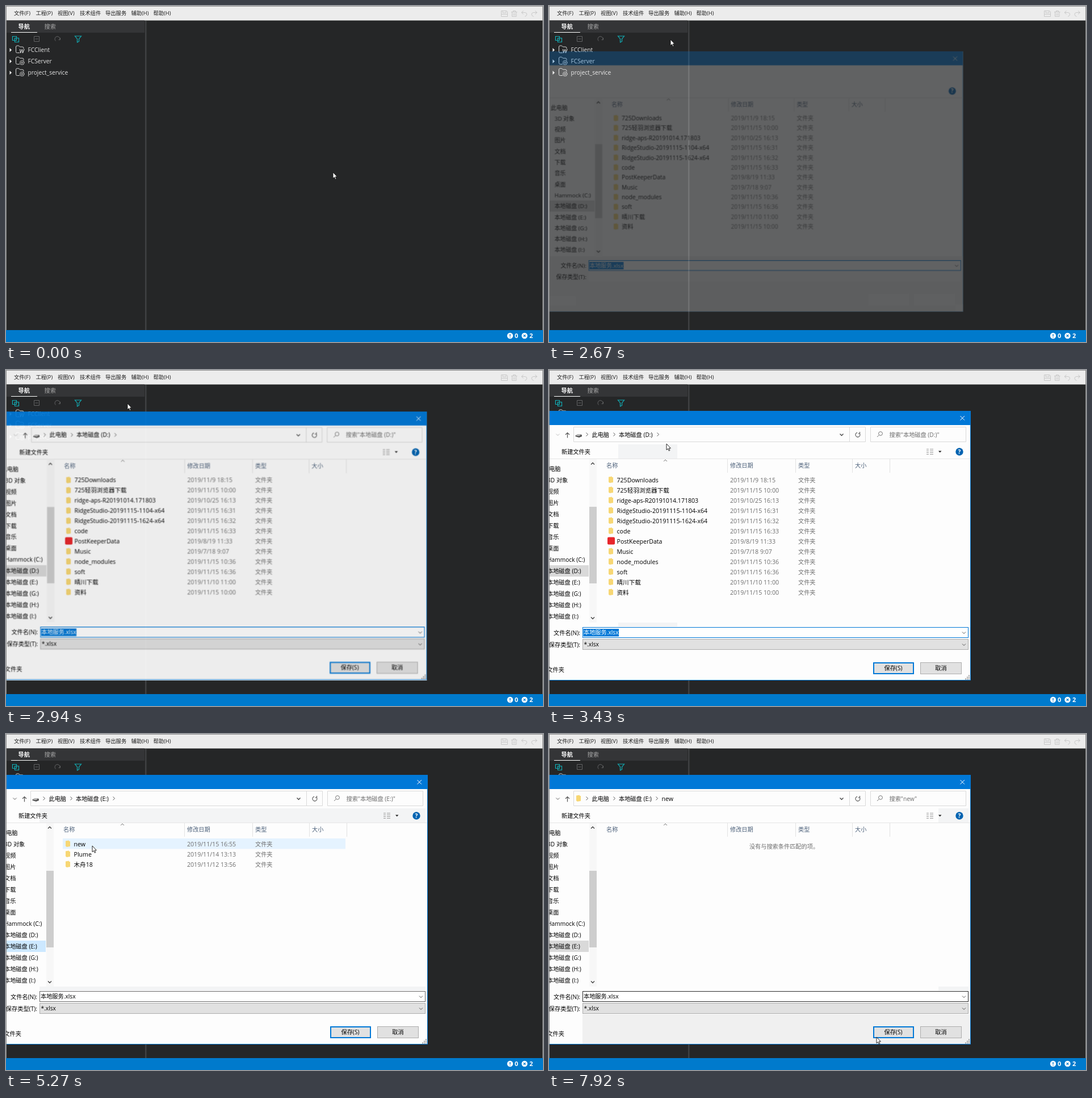
Recreate the animation shown at these times as an HTML page. Size 946x592 px, loop 8000 ms.

```html
<!DOCTYPE html>
<html>
<head>
<meta charset="utf-8">
<title>Export local services</title>
<style>
html, body { margin: 0; width: 100%; height: 100%; overflow: hidden; background: #252627; }
svg { display: block; width: 946px; height: 592px; }
text { font: 10.2px "Open Sans", "Noto Sans CJK SC", "Noto Sans CJK", sans-serif; white-space: pre; }
.line { fill: none; }
.bar text { font-size: 9.3px; fill: #1c1c1c; }
.tree text { font-size: 10.2px; fill: #e4e4e4; }
.status text { font-size: 11px; font-weight: 700; fill: #fff; }
.head text { fill: #4c607a; }
.latin { font-size: 10.6px; }
.date { font-size: 10.6px; fill: #6d6d6d; }
.grey { fill: #6d6d6d; }
.end { text-anchor: end; }
.mid { text-anchor: middle; }

/* Everything switches in hard steps on one 8 s clock (1% = 80 ms). */
.k { animation: 8s step-end infinite; }
.menu { animation-name: menu; }
.dialog { animation-name: dialog; transform-origin: 362px 309.5px; }
.early { animation-name: early; }
.late { animation-name: late; }
.in-d { animation-name: in-d; }
.in-e { animation-name: in-e; }
.in-new { animation-name: in-new; }
.marked { animation-name: marked; }
.field { animation-name: field; }
.pick { animation-name: pick; }
.drive-hover { animation-name: drive-hover; }
.row-hover { animation-name: row-hover; }
.band { animation-name: band; }
.foot { animation-name: foot; }
.pointer { animation-name: pointer; }
.arrow { animation-name: arrow; }
.hand { animation-name: hand; }

@keyframes menu { 0% { opacity: 0 } 17.25% { opacity: 1 } 31.5%, 100% { opacity: 0 } }
@keyframes dialog {
  0% { opacity: 0; transform: scale(.96) }
  33.375% { opacity: .28; transform: scale(.965) }
  34.875% { opacity: .6; transform: scale(.979) }
  36.75% { opacity: .93; transform: scale(.996) }
  38.625%, 100% { opacity: 1; transform: scale(1) }
}
@keyframes early { 0% { opacity: 1 } 36.75%, 100% { opacity: 0 } }
@keyframes late { 0% { opacity: 0 } 36.75%, 100% { opacity: 1 } }
@keyframes in-d { 0% { opacity: 1 } 56.375%, 100% { opacity: 0 } }
@keyframes in-e { 0% { opacity: 0 } 56.375% { opacity: 1 } 71%, 100% { opacity: 0 } }
@keyframes in-new { 0% { opacity: 0 } 71%, 100% { opacity: 1 } }
@keyframes marked { 0% { opacity: 1 } 54.75%, 100% { opacity: 0 } }
@keyframes field { 0% { stroke: #0078d7 } 57.875% { stroke: #6a6a6a } 87.875%, 100% { stroke: #2b2b2b } }
@keyframes pick {
  0% { fill: #d9d9d9; transform: translateY(0) }
  54.75% { fill: #cce8ff; transform: translateY(20px) }
  67.5%, 100% { fill: #d9d9d9; transform: translateY(20px) }
}
@keyframes drive-hover { 0% { opacity: 0 } 51.375% { opacity: 1 } 54.75%, 100% { opacity: 0 } }
@keyframes row-hover {
  0% { opacity: 0; fill: #e5f3ff; transform: translateY(0) }
  44.75% { opacity: 1; fill: #e5f3ff; transform: translateY(0) }
  46.375% { opacity: 1; fill: #e5f3ff; transform: translateY(54px) }
  48% { opacity: 1; fill: #e5f3ff; transform: translateY(108px) }
  49.625% { opacity: 0; fill: #e5f3ff; transform: translateY(0) }
  61.125% { opacity: 1; fill: #e5f3ff; transform: translateY(36px) }
  62.625% { opacity: 1; fill: #e5f3ff; transform: translateY(18px) }
  64.25% { opacity: 1; fill: #e5f3ff; transform: translateY(0) }
  67.5% { opacity: 1; fill: #cce8ff; transform: translateY(0) }
  71%, 100% { opacity: 0; fill: #cce8ff; transform: translateY(0) }
}
@keyframes band {
  0% { opacity: 0; x: 122px; width: 104px }
  40.5% { opacity: 1; x: 122px; width: 104px }
  46.375% { opacity: 1; x: 100px; width: 498px }
  57.875% { opacity: 1; x: 59px; width: 680px }
  71%, 100% { opacity: 1; x: 686px; width: 53px }
}
@keyframes foot { 0% { opacity: 0 } 92.625%, 100% { opacity: 1 } }
@keyframes arrow {
  0% { opacity: 1 } 13.875% { opacity: 0 } 31.5% { opacity: 1 }
  51.375% { opacity: 0 } 57.875%, 100% { opacity: 1 }
}
@keyframes hand {
  0% { opacity: 0 } 13.875% { opacity: 1 } 31.5% { opacity: 0 }
  51.375% { opacity: 1 } 57.875%, 100% { opacity: 0 }
}
@keyframes pointer {
  0% { transform: translate(576px, 293px) }
  1.875% { transform: translate(545px, 268px) }
  3.5% { transform: translate(430px, 188px) }
  5.25% { transform: translate(250px, 96px) }
  7% { transform: translate(95px, 40px) }
  8.625% { transform: translate(26px, 18px) }
  10.375% { transform: translate(75px, 12px) }
  12.125% { transform: translate(142px, 9px) }
  13.875% { transform: translate(188px, 9px) }
  17.25% { transform: translate(190px, 11px) }
  19% { transform: translate(193px, 15px) }
  21% { transform: translate(201px, 30px) }
  22.875% { transform: translate(209px, 44px) }
  24.375% { transform: translate(212px, 52px) }
  26.25% { transform: translate(214px, 57px) }
  28% { transform: translate(214px, 59px) }
  40.5% { transform: translate(212px, 85px) }
  42.875% { transform: translate(207px, 130px) }
  44.75% { transform: translate(185px, 190px) }
  46.375% { transform: translate(153px, 244px) }
  48% { transform: translate(118px, 298px) }
  49.625% { transform: translate(78px, 345px) }
  51.375% { transform: translate(52px, 371px) }
  53% { transform: translate(45px, 379px) }
  57.875% { transform: translate(58px, 348px) }
  59.5% { transform: translate(90px, 290px) }
  61.125% { transform: translate(124px, 230px) }
  62.625% { transform: translate(144px, 207px) }
  64.25% { transform: translate(151px, 199px) }
  65.875% { transform: translate(152px, 197px) }
  79.5% { transform: translate(181px, 252px) }
  81.25% { transform: translate(215px, 295px) }
  82.875% { transform: translate(224px, 323px) }
  84.5% { transform: translate(208px, 380px) }
  86.125% { transform: translate(150px, 435px) }
  87.875% { transform: translate(190px, 460px) }
  89.5% { transform: translate(310px, 474px) }
  91.125% { transform: translate(430px, 478px) }
  92.625% { transform: translate(520px, 508px) }
  94.25% { transform: translate(560px, 527px) }
  96% { transform: translate(573px, 533px) }
  99%, 100% { transform: translate(577px, 534px) }
}
</style>
</head>
<body>
<svg viewBox="0 0 946 592">
  <defs>
    <path id="folder" d="M0 .5 6-.5V1H8V10L2 11 0 9.5Z" fill="#f7d774"/>
    <path id="next" class="line" d="M-1.5-3 1.5 0-1.5 3" stroke="#555"/>
    <path id="down" class="line" d="M-3-1.5 0 1.5 3-1.5"/>
    <g id="project" class="line" stroke="#d5d5d5">
      <path d="M24 5.5H19.5Q17.5 5.5 17.5 3.5V-5Q17.5-7 19.5-7H22.5L24.5-5H29Q31 -5 31-3V-1.5"/>
    </g>
    <g id="gear" class="line" stroke="#d5d5d5">
      <circle cx="28.3" cy="2.8" r="3.6" stroke-width="1.3" stroke-dasharray="1.6 .7"/>
      <circle cx="28.3" cy="2.8" r="1.3"/>
    </g>
  </defs>

  <rect width="946" height="592" fill="#252627"/>

  <!-- menu bar -->
  <g class="bar">
    <rect width="946" height="25.5" fill="#ececec"/>
    <rect class="k menu" x="171" y="1" width="45" height="25" fill="#fdfdfd"/>
    <text x="14" y="16">文件(F)</text><text x="52.5" y="16">工程(P)</text>
    <text x="91" y="16">视图(V)</text><text x="130" y="16">技术组件</text>
    <text x="175" y="16">导出服务</text><text x="220.5" y="16">辅助(H)</text>
    <text x="259.5" y="16">帮助(H)</text>
    <g class="line" stroke="#c9c9c9">
      <path d="M872.5 8.5H881.5L883.5 10V18.5H872.5ZM875 8.5V12H881V8.5M872.5 14.5H883.5"/>
      <path d="M890 10.5H900.5M893.5 10V8.5H897.5V10M891.5 11V18.5H899V11M894 12.5V17M896.5 12.5V17"/>
      <path d="M911.5 8.5 908 11.5 911.5 14.5M908 11.5H914.5Q918 12 917.5 15T914 18.5"/>
      <path d="M932 8.5 935.5 11.5 932 14.5M935.5 11.5H929Q925.5 12 926 15T929.5 18.5"/>
    </g>
  </g>

  <!-- navigator -->
  <g class="tree">
    <rect x="1" y="25.5" width="243" height="21.5" fill="#343537"/>
    <rect x="245" y="26" width="2.5" height="545" fill="#3f4042"/>
    <text x="21.5" y="39.5" style="fill:#fff;font-weight:700">导航</text>
    <text x="67.5" y="39.5" style="fill:#a9a9a9">搜索</text>
    <rect x="9" y="46" width="46" height="1" fill="#fff"/>
    <g class="line" stroke="#12aeb6" stroke-width="1.2">
      <path d="M11.5 53.5H18.5V60.5H11.5ZM15.5 56.5H22.5V63.5H15.5Z"/>
      <path d="M121.5 53H132.5L128.5 58V62.5L125.5 64V58Z"/>
    </g>
    <g class="line" stroke="#626364">
      <path d="M49.5 53.5H58.5V62.5H49.5ZM51.5 58H56.5"/>
      <path d="M87.5 61.5A4.5 4.5 0 1 1 95 58.5M95.5 56V59.5H92.5"/>
    </g>
    <g id="projects"></g>
  </g>

  <!-- status bar -->
  <g class="status">
    <rect y="571" width="946" height="21" fill="#007acc"/>
    <circle cx="888" cy="581" r="5.2" fill="#fff"/>
    <path d="M888 578V582M888 583V584.3" stroke="#007acc" stroke-width="1.4"/>
    <text x="896" y="585">0</text>
    <circle cx="913.5" cy="581" r="5.2" fill="#fff"/>
    <path d="M911.6 579.1 915.4 582.9M915.4 579.1 911.6 582.9" stroke="#007acc" stroke-width="1.3"/>
    <text x="922" y="585">2</text>
  </g>

  <g class="k menu bar">
    <rect x="171" y="25" width="166.5" height="50.5" fill="#fdfdfd"/>
    <text x="188" y="40.7">导出已发布服务</text>
    <text x="188" y="65.5">导出本地服务</text>
  </g>

  <!-- save dialog -->
  <g class="k dialog">
    <rect x="-20" y="72" width="763" height="475" fill="#0078d7"/>
    <rect x="-20" y="97" width="762" height="449" fill="#fdfdfd"/>
    <path d="M724.5 81 732 88.5M732 81 724.5 88.5" stroke="#fff"/>
    <rect class="k band" y="131" height="26" fill="#f3f4f5"/>
    <rect class="k band" y="445" height="7" fill="#f3f4f5"/>
    <rect class="k foot" x="59" y="494" width="683" height="52" fill="#f0f0f0"/>
    <rect class="k early" x="-20" y="446" width="762" height="100" fill="#f0f0f0"/>
    <path d="M-20 156.5H742" stroke="#e6e6e6"/>
    <circle cx="723" cy="144" r="6.7" fill="#0063b1"/>
    <text class="mid" x="723" y="147.6" style="fill:#fff;font-weight:700">?</text>

    <g class="head">
      <path d="M314.5 157V181M434.5 157V181M534.5 157V181M600.5 157V181" stroke="#e2e2e2"/>
      <path class="line" d="M202 161 205 158 208 161" stroke="#777"/>
      <text x="101" y="172">名称</text><text x="319" y="172">修改日期</text>
      <text x="439" y="172">类型</text><text x="539" y="172">大小</text>
    </g>

    <!-- drives -->
    <rect x="71" y="157" width="13" height="288" fill="#f7f7f7"/>
    <rect x="71" y="241" width="13" height="135" fill="#cdcdcd"/>
    <use href="#down" transform="translate(77 165) scale(1 -1)" stroke="#444" stroke-width="1.4"/>
    <use href="#down" x="77" y="437" stroke="#444" stroke-width="1.4"/>
    <rect class="k pick" x="-20" y="344" width="90" height="20"/>
    <rect class="k drive-hover" x="-20" y="364" width="90" height="20" fill="#e5f3ff"/>
    <g id="places"></g>

    <!-- files -->
    <rect class="k row-hover" x="100" y="184" width="498" height="18.5"/>
    <g id="listD" class="k in-d"></g>
    <g id="listE" class="k in-e"></g>
    <text class="k in-new grey mid" x="414" y="202">没有与搜索条件匹配的项。</text>

    <!-- file name -->
    <text class="end" x="55" y="466.5">文件名(N):</text>
    <text class="end" x="55" y="487.5">保存类型(T):</text>
    <rect class="k field" x="59.5" y="453.5" width="679" height="18" fill="#fff"/>
    <use href="#down" x="731" y="463" stroke="#555"/>
    <text x="61" y="466">本地服务.xlsx</text>
    <g class="k marked">
      <rect x="60.5" y="456" width="62.5" height="13.5" fill="#0078d7"/>
      <text x="61" y="466" fill="#fff">本地服务.xlsx</text>
    </g>

    <g class="k early" fill="#f8f8f8">
      <path d="M59 474H739V492H59ZM-20 518H36V536H-20ZM570 514H644V536H570ZM653 514H728V536H653ZM729 533H742V546H729Z"/>
    </g>

    <g class="k late">
      <rect x="59.5" y="474.5" width="679" height="18" fill="#e1e1e1" stroke="#adadad"/>
      <text x="61.5" y="487">*.xlsx</text>
      <use href="#down" x="731" y="484" stroke="#555"/>
      <rect x="572" y="516" width="70" height="19" fill="#e1e1e1" stroke="#0078d7" stroke-width="2"/>
      <text class="mid" x="606.5" y="529">保存(S)</text>
      <rect x="654.5" y="515.5" width="72" height="20" fill="#e1e1e1" stroke="#adadad"/>
      <text class="mid" x="690.5" y="529">取消</text>
      <text class="end" x="27" y="531.5">隐藏文件夹</text>
      <path d="M739 538.5H741M736 541.5H741M733 544.5H741" stroke="#999" stroke-width="2" stroke-dasharray="2 1"/>

      <!-- address and search -->
      <g class="line" stroke="#d9d9d9">
        <path d="M43.5 100.5H557.5V126.5H43.5ZM529.5 100.5V126.5M566.5 100.5H734.5V126.5H566.5Z"/>
      </g>
      <use class="k in-d" href="#down" x="15.5" y="114" stroke="#bbb"/>
      <use class="k in-e" href="#down" x="15.5" y="114" stroke="#555"/>
      <use class="k in-new" href="#down" x="15.5" y="114" stroke="#555"/>
      <path class="line" d="M32.5 119.5V110.5M29 114 32.5 110.5 36 114" stroke="#555" stroke-width="1.2"/>
      <use href="#down" x="515.5" y="114" stroke="#444" stroke-width="1.3"/>
      <path class="line" d="M547 111.5A4 4 0 1 1 543 110.2M547.5 109V112H544.5" stroke="#555" stroke-width="1.1"/>
      <g class="line" stroke="#777"><circle cx="584" cy="112" r="3.4"/><path d="M581.5 114.5 578 118"/></g>
      <use href="#next" x="67" y="113.5"/><use href="#next" x="115" y="113.5"/>
      <text x="75.5" y="117.5">此电脑</text>
      <g id="trail"></g>

      <text x="22" y="148">新建文件夹</text>
      <path d="M665 139.5H669M665 142.5H669M665 145.5H669M665 148.5H669M671 139.5H677M671 142.5H677M671 145.5H677M671 148.5H677" stroke="#9a9a9a"/>
      <path d="M686 142.5H691.5L688.7 145.5Z" fill="#222"/>
    </g>
  </g>

  <path d="M0 .5H946M.5 0V571M945.5 0V571" stroke="#8d8d8d"/>

  <g class="k pointer" stroke="#111" stroke-width=".9" stroke-linejoin="round" fill="#fff">
    <path class="k arrow" d="M0 0V10.8L2.5 8.6 4.2 12.4 5.9 11.6 4.2 7.9H7.4Z"/>
    <g class="k hand">
      <path d="M-1.2 1.3Q0-.7 1.2 1.3V5.2L5.8 6.2Q7.2 6.7 7 8.4L6 12V14H-1L-4 9.2Q-4.6 7.2-2.8 7.4L-1.2 9Z"/>
      <path class="line" d="M1.2 5V8M3.2 6V8.3M5 6.4V8.5"/>
    </g>
  </g>
</svg>

<script>
const fill = (id, items, draw) => {
  document.getElementById(id).innerHTML = items.map(draw).join('');
};
const label = (x, y, s, cls = '') => `<text class="${cls}" x="${x}" y="${y}">${s}</text>`;

fill('projects', ['FCClient', 'FCServer', 'project_service'], (name, i) => {
  const y = 77 + 20 * i;
  const badge = i ? `<use href="#gear" y="${y}"/>`
    : label(23.5, y + 5.5, 'W').replace('<text', '<text style="font:italic 700 9px Lato,sans-serif"');
  return `<path d="M6.5 ${y - 3}L10 ${y + .5} 6.5 ${y + 4}Z" fill="#eee"/>
    <use href="#project" y="${y}"/>${badge}${label(38.5, y + 3.8, name)}`;
});

const places = ['此电脑', '3D 对象', '视频', '图片', '文档', '下载', '音乐', '桌面', 'Hammock (C:)',
  ...[...'DEGHI'].map(d => `本地磁盘 (${d}:)`)];
fill('places', places, (name, i) => label(i ? -3 : -10, 178 + 20 * i, name));

const fileRow = ([name, date], i) => {
  const y = 193.5 + 18 * i;
  const app = name.endsWith('Data')
    ? `<rect class="k late" x="103" y="${y - 7}" width="13" height="13" rx="2" fill="#e8262b"/>` : '';
  return `<use href="#folder" x="105" y="${y - 5.5}"/>${app}
    ${label(119.5, y + 4, name, 'latin')}${label(319, y + 4, '2019/' + date, 'date')}
    ${label(439, y + 4, '文件夹', 'grey')}`;
};
fill('listD', [
  ['725Downloads', '11/9 18:15'],
  ['725轻羽浏览器下载', '11/15 10:00'],
  ['ridge-aps-R20191014.171803', '10/25 16:13'],
  ['RidgeStudio-20191115-1104-x64', '11/15 16:31'],
  ['RidgeStudio-20191115-1624-x64', '11/15 16:32'],
  ['code', '11/15 16:33'],
  ['PostKeeperData', '8/19 11:33'],
  ['Music', '7/18 9:07'],
  ['node_modules', '11/15 10:36'],
  ['soft', '11/15 16:36'],
  ['晴川下载', '11/10 11:00'],
  ['资料', '11/15 10:00'],
], fileRow);
fill('listE', [
  ['new', '11/15 16:55'],
  ['Plume', '11/14 13:13'],
  ['木舟18', '11/12 13:56'],
], fileRow);

const drive = '<path d="M46.500 115.500 50 113.500H57L58 115.500V117L53 119 46.500 117Z" fill="#555"/><path d="M47 115.500 50 113.500H57L53 116.500Z" fill="#bbb"/>';
fill('trail', [
  ['in-d', 'D', 192, '本地磁盘 (D:)'],
  ['in-e', 'E', 190, '本地磁盘 (E:)'],
  ['in-new', 'E', 190, 'new'],
], ([cls, d, x, query]) => `<g class="k ${cls}">
  ${query === 'new' ? '<use href="#folder" x="48" y="108"/>' + label(198.5, 117.5, 'new', 'latin') : drive}
  ${label(123, 117.5, `本地磁盘 (${d}:)`)}<use href="#next" x="${x}" y="113.5"/>
  ${label(599.5, 117.5, `搜索"${query}"`, 'grey')}</g>`);
</script>
</body>
</html>
```
